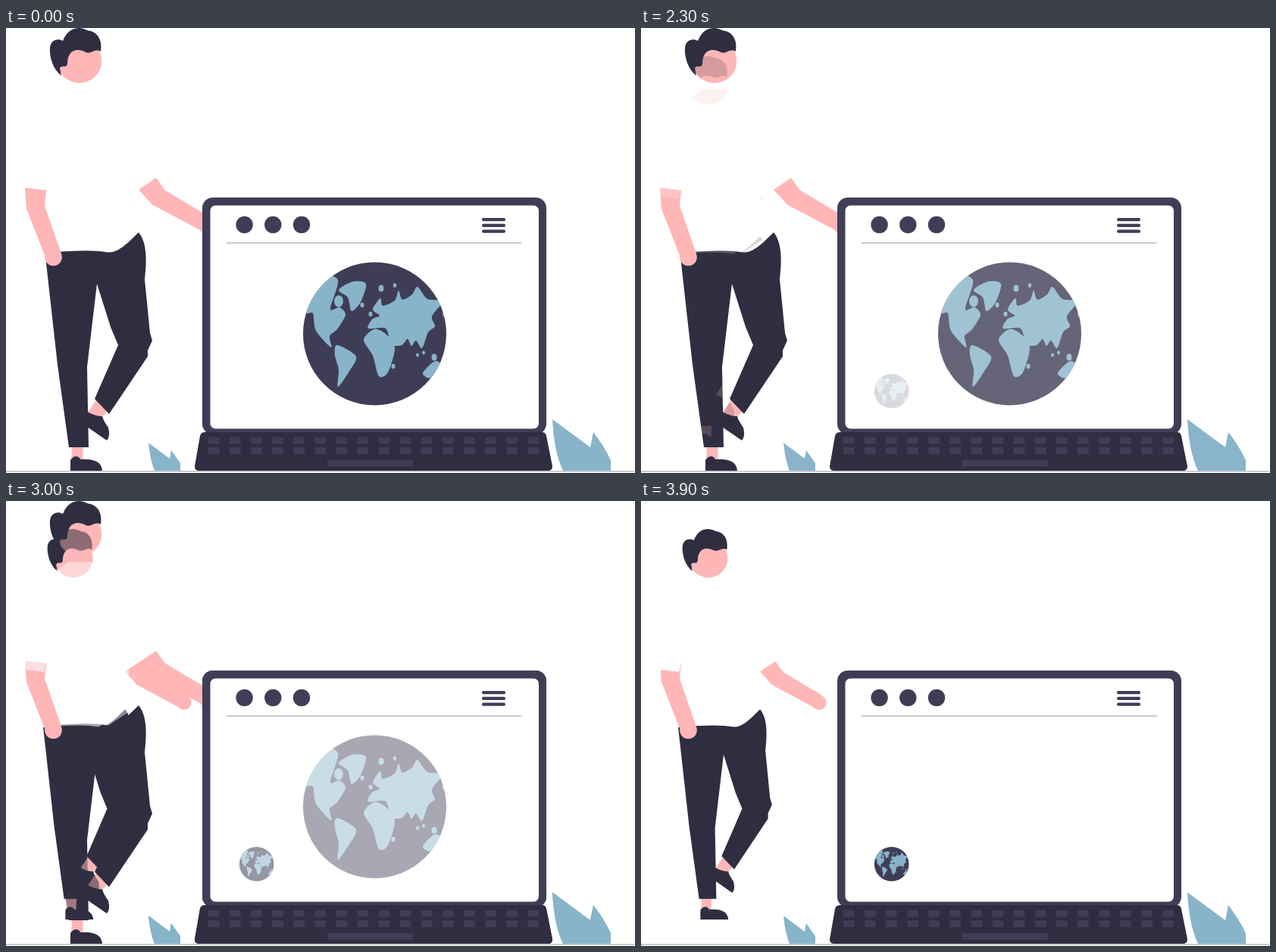
An HTML page with a canvas for the animation above (5.9 s loop, 830 by 588 pixels).

```html
<!DOCTYPE html>
<html lang="en">
<head>
<meta charset="utf-8">
<title>Globe on a laptop</title>
<style>
html, body { margin: 0; width: 100%; height: 100%; overflow: hidden; background: #fff; }
canvas { display: block; }
</style>
</head>
<body>
<canvas id="stage" width="830" height="588"></canvas>
<script>
const W = 830, H = 588;
const LOOP = 5900, FADE_START = 2000, FADE_END = 3900, STEP = 100, STEPS = 20;
const DARK = '#2f2e41', FRAME = '#3f3d56', SKIN = '#ffb6b6', BLUE = '#88b4ca', LINE = '#cbcbcb', WHITE = '#fff';

function layer(paint) {
  const canvas = document.createElement('canvas');
  canvas.width = W;
  canvas.height = H;
  paint(canvas.getContext('2d'));
  return canvas;
}

function shape(c, color, path) {
  c.fillStyle = color;
  c.fill(path instanceof Path2D ? path : new Path2D(path));
}

function oval(c, color, x, y, rx, ry = rx) {
  const path = new Path2D();
  path.ellipse(x, y, rx, ry, 0, 0, 7);
  shape(c, color, path);
}

function box(c, color, x, y, w, h, r = 0) {
  const path = new Path2D();
  path.roundRect(x, y, w, h, r);
  shape(c, color, path);
}

// Closed smooth curve through a few key points.
function coast(text) {
  const points = text.split(',').map(pair => pair.trim().split(' ').map(Number));
  const at = i => points[(i + points.length) % points.length];
  const handle = (p, from, to) => p.map((v, k) => v + (to[k] - from[k]) / 7);
  const path = new Path2D();
  path.moveTo(...points[0]);
  points.forEach((p, i) => {
    const next = at(i + 1);
    path.bezierCurveTo(...handle(p, at(i - 1), next), ...handle(next, at(i + 2), p), ...next);
  });
  return path;
}

const land = {
  northAmerica: '396 374, 412 328, 438 333, 428 371, 440 369, 448 379, 437 398, 427 407, 429 422, 409 400, 405 377',
  greenland: '439 346, 458 335, 475 338, 468 362, 456 374, 451 356',
  southAmerica: '437 419, 462 434, 452 455, 438 474, 439 452, 434 432',
  africa: '472 412, 486 398, 502 405, 513 423, 504 455, 492 460, 484 433',
  eurasia: '478 397, 483 385, 493 380, 484 372, 494 357, 497 367, 513 360, 518 347, 523 359, 536 352, 543 342, ' +
    '556 358, 576 361, 562 381, 566 394, 557 402, 549 423, 541 413, 535 420, 530 411, 522 419, 508 418, 501 397',
  australia: '550 456, 567 440, 580 452, 561 463'
};
const coasts = Object.values(land).map(coast);
const islands = [[439, 361, 6], [470, 366, 2.5], [495, 344, 3.5], [513, 340, 2.2], [481, 378, 2.5],
  [511, 447, 2.5], [543, 432, 2], [551, 429, 2], [565, 435, 3.5], [579, 378, 3]];

function globe(c, x, y, r) {
  c.save();
  c.translate(x, y);
  c.scale(r / 94.5, r / 94.5);
  c.translate(-486.5, -404);
  oval(c, FRAME, 486.5, 404, 94.5);
  c.beginPath();
  c.arc(486.5, 404, 94.5, 0, 7);
  c.clip();
  for (const path of coasts) shape(c, BLUE, path);
  for (const [ix, iy, size] of islands) oval(c, BLUE, ix, iy, size, size * 1.3);
  c.restore();
}

function person(c, small) {
  const resize = () => { if (small) c.setTransform(0.875, 0, 0, 0.882, 4, 37); };
  resize();
  // torso, right arm, ankles
  shape(c, WHITE, 'M82 80.5H113L165 115L198 198L175 213L162 221V232L175 270L130 300H60L56 198L50 104Z');
  shape(c, SKIN, 'M175 213.5L198 198L210 214.5L268 249L258 268L193 233.5Z');
  oval(c, SKIN, 264, 260, 11);
  shape(c, SKIN, 'M87 550H102L101 575H86ZM120 490L134 506L125 516L108 508Z');
  // trousers and shoes
  shape(c, DARK, 'M51.5 297Q112 292 131 296C146 299 158 287 175 270C184 281 187 300 183 332L190 403L193 413L187 426V434L136 510L117 490L148 419L138 395L120 338L107 448L109 554H83L68 445Z');
  shape(c, DARK, 'M85 571C90 563 97 566 98 570Q126 568 127 585H85Z');
  shape(c, DARK, 'M107 507Q118 513 127 513Q129 520 135 528Q138 540 133 545L107 527Z');
  // head
  oval(c, SKIN, 97, 43.5, 29.3);
  shape(c, DARK, 'M73 63C62 55 57 38 58 26C59 16 68 13 75 17C80 5 87 0 97 0C106 1 107 4 112 4C123 8 127 18 125 31C117 26 113 35 105 32C92 25 81 31 81 47C80 54 74 48 71 53Z');
  // the left arm keeps its size while the sleeve follows the body
  c.resetTransform();
  shape(c, SKIN, 'M25 211L53 214L51 235L73 298L52 303L27 239Z');
  oval(c, SKIN, 62.5, 303, 11.3);
  resize();
  shape(c, WHITE, 'M24.5 211L53 214L56 198L40 150L23 195Z');
  c.resetTransform();
}

function laptop(c) {
  box(c, FRAME, 259, 224, 454, 313, 14);
  box(c, WHITE, 269.5, 234.5, 433.5, 295, 7);
  shape(c, DARK, 'M263 534H707Q712 534 713 539L721 579Q721 585 715 585H255Q249 585 249 579L256 539Q257 534 263 534Z');
  for (let i = 0; i < 32; i++) {
    box(c, FRAME, 267 + 28.1 * (i % 16), i < 16 ? 540.5 : 554, 14.5, 9);
  }
  box(c, FRAME, 424, 571, 113, 8.5);
  for (let i = 0; i < 3; i++) {
    oval(c, FRAME, 314.6 + 37.7 * i, 260, 11.2);
    box(c, FRAME, 628, 251 + 7.8 * i, 31, 4.2, 2);
  }
  box(c, LINE, 291, 283, 389.5, 2);
}

function scene(c, small) {
  box(c, LINE, 0, 585, 829, 2);
  shape(c, BLUE, 'M188 548L216 569L218 558L230 575V585H196Q190 570 188 548Z');
  shape(c, BLUE, 'M721 517L771 554L775 534Q789 552 798 571V585H735Q723 560 721 517Z');
  person(c, small);
  laptop(c);
  if (small) globe(c, 330.7, 479.7, 22.8);
  else globe(c, 486.5, 404, 94.5);
}

const first = layer(c => scene(c, false));
const second = layer(c => scene(c, true));

// The shared area dissolves; the rest of the second pose pops in past halfway.
function mix(amount) {
  return layer(c => {
    c.drawImage(first, 0, 0);
    c.globalCompositeOperation = 'source-atop';
    c.globalAlpha = amount;
    c.drawImage(second, 0, 0);
    if (amount > 0.5) {
      c.globalCompositeOperation = 'destination-over';
      c.globalAlpha = 1;
      c.drawImage(second, 0, 0);
    }
  });
}

const blends = Array.from({ length: STEPS - 2 }, (_, i) => mix((i + 1) / STEPS));
const view = document.getElementById('stage').getContext('2d');

function pictureAt(t) {
  if (t < FADE_START) return first;
  if (t >= FADE_END) return second;
  return blends[Math.min(blends.length - 1, Math.floor((t - FADE_START) / STEP))];
}

function draw() {
  view.clearRect(0, 0, W, H);
  view.drawImage(pictureAt(performance.now() % LOOP), 0, 0);
  requestAnimationFrame(draw);
}
draw();
</script>
</body>
</html>
```
